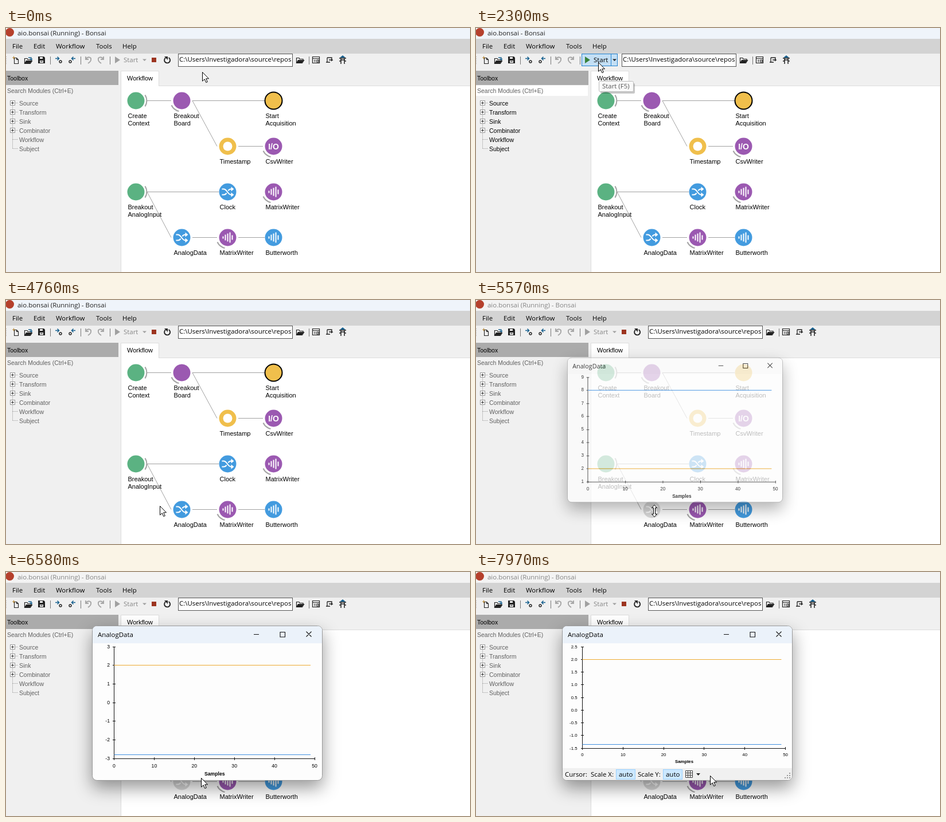
Animation of 809 by 428 pixels, one loop 8 s. Source, as an HTML page:

```html
<!DOCTYPE html>
<html lang="en">
<head>
<meta charset="utf-8">
<title>Workflow editor</title>
<style>
html, body { margin: 0; width: 100%; height: 100%; overflow: hidden; background: #fff; }
svg { display: block; width: 809px; height: 428px; }
text { font: 11px "Liberation Sans", Arial, sans-serif; white-space: pre; }
.ui { font: 11.45px "Open Sans", "Noto Sans", sans-serif; }
.tree { font-size: 10.5px; }
#window { filter: drop-shadow(0 13px 15px rgba(0,0,0,.4)); }
</style>
</head>
<body>
<svg id="stage" viewBox="0 0 809 428"></svg>
<script>
const LOOP = 8000;
const $ = id => document.getElementById(id);
const text = (x, y, s, attrs = '') => `<text x="${x}" y="${y}" ${attrs}>${s}</text>`;
const ui = (x, y, s, attrs = '') => text(x, y, s, 'class="ui" ' + attrs);
const rect = (x, y, w, h, fill, attrs = '') =>
  `<rect x="${x}" y="${y}" width="${w}" height="${h}" fill="${fill}" ${attrs}/>`;
const line = (d, color = '#333', width = 1, attrs = '') =>
  `<path d="${d}" fill="none" stroke="${color}" stroke-width="${width}" ${attrs}/>`;
const shape = (d, fill, attrs = '') => `<path d="${d}" fill="${fill}" ${attrs}/>`;
const at = (x, y, s, flip = 1) => `<g transform="translate(${x} ${y}) scale(${flip} 1)">${s}</g>`;

// Workflow nodes
const GREEN = '#5bb282', PURPLE = '#9b59b1', YELLOW = '#f0bf4c', BLUE = '#439bdf';
const icons = {
  shuffle: line('M-10-5h3c6 0 7 10 13 10h2M-10 5h3c2 0 4-1 5-3M1-2c1-2 3-3 5-3h2', '#fff', 2) +
    shape('M6-9l5 4-5 4zM6 1l5 4-5 4z', '#fff'),
  bars: line('M-8-2v4M-4-5v10M0-7v14M4-9v18M8-4v8', '#fff', 2),
  io: text(0, 5, 'I/O', 'fill="#fff" text-anchor="middle" style="font-size:14px;font-weight:bold"'),
  dot: '<circle r="8" fill="#fff"/>'
};
const arcs = {
  out: line('M16-10A19 19 0 0 1 16 10', '#a5a5a5', 2.2),
  in: line('M-18 8A19.5 19.5 0 0 0-5 18.5', '#a5a5a5', 2.2)
};
function node(col, row, color, label, icon, arc, attrs = '') {
  const names = label.split(' ').map((s, i) => text(-14, 30 + 13 * i, s)).join('');
  return at(226.5 + 80 * col, 127.5 + 80 * row,
    (arcs[arc] || '') + `<circle r="15" fill="${color}" ${attrs}/>` + (icons[icon] || '') + names);
}
const nodes =
  line('M246 127.5H288M325 127.5H451M325 127.5L368 207.5M405 207.5H448M246 287.5H371' +
    'M246 287.5L288 367.5M325 367.5H368M405 367.5H451', '#a0a0a0') +
  node(0, 0, GREEN, 'Create Context', '', 'out') +
  node(1, 0, PURPLE, 'Breakout Board', '', 'in') +
  node(3, 0, YELLOW, 'Start Acquisition', '', '', 'id="ringed" stroke="#000"') +
  node(2, 1, YELLOW, 'Timestamp', 'dot') +
  node(3, 1, PURPLE, 'CsvWriter', 'io', 'in') +
  node(0, 2, GREEN, 'Breakout AnalogInput', '', 'out') +
  node(2, 2, BLUE, 'Clock', 'shuffle') +
  node(3, 2, PURPLE, 'MatrixWriter', 'bars', 'in') +
  node(1, 3, BLUE, 'AnalogData', 'shuffle', '', 'id="picked"') +
  node(2, 3, PURPLE, 'MatrixWriter', 'bars', 'in') +
  node(3, 3, BLUE, 'Butterworth', 'bars');

// Toolbar
const folder = line('M.5 11.5V2.5H5l1 2h6v2M.5 11.5l3-5h10l-3 5z', '#222', 1.2) + shape('M3 7h10l-3 4H1z', '#222');
const sep = x => line(`M${x} 50V64`, '#777');
const undo = line('M2 1v5h5M2 6C6 0 12 2 11 7C11 9 9 11 6 13', '#a6a6a6', 1.9);
const jump = line('M0 3.5H6M3.5 .5l3 3-3 3', '#16608f', 1.5) +
  '<circle cx="9" cy="9" r="2" fill="none" stroke="#222" stroke-width="1.4"/>';
const tools =
  line('M.5 50V63', '#aaa', 1, 'stroke-dasharray="1 2"') +
  at(11, 49, line('M3.5 3.5h4l3 3v7h-7zM7.5 3.5v3h3', '#222', 1.1) + line('M0 3h5M2.5 .5v5', '#b8862d')) +
  at(32, 51, folder + line('M7 1h5v4M10 3l2 2 2-2', '#16608f', 1.3)) +
  at(56, 50, shape('M0 0h10l2 2v10H0z', '#222') + rect(3, 1, 5, 3, '#f0f0f0') + rect(3, 7, 6, 4, '#f0f0f0') + rect(4, 8, 4, 1, '#222')) +
  sep(77.5) + at(86, 50, jump) + at(121, 50, jump, -1) +
  sep(130.5) + at(137, 49, undo) + at(172, 49, undo, -1) + sep(181.5);
const pathBox =
  rect(300.5, 45.5, 199, 22, '#fff', 'stroke="#555"') +
  '<clipPath id="clip"><rect x="301" y="46" width="197" height="21"/></clipPath>' +
  ui(302, 59, 'C:\\Users\\Investigadora\\source\\repos\\', 'clip-path="url(#clip)"') +
  at(506, 50, folder) + sep(528.5) +
  at(534, 50, line('M.5 .5h12v11h-12zM.5 3.5h12M3 6.5h3M3 9h3M8 6h3v4H8z', '#222', 1.2)) +
  at(557, 49, line('M3 3h8v3M3 3v8h5M1 11h7M6 7h6l-2-2M12 7l-2 2', '#222', 1.3)) +
  at(580, 48, shape('M7 0l5 4H2z', '#16608f') + line('M1 5h12M3 8h8M4 5v10M10 5v10M1 10h3M10 10h3', '#222', 1.5));

// Toolbox tree
const tree = ['Source', 'Transform', 'Sink', 'Combinator', 'Workflow', 'Subject'].map((s, i) => {
  const y = 131.5 + 16 * i;
  return line(`M11.5 ${y}H21`, '#999', 1, 'stroke-dasharray="1 1"') +
    (i < 4 ? rect(7.5, y - 4, 8, 8, '#fff', 'stroke="#999"') + line(`M9 ${y}h5M11.5 ${y - 2.5}v5`, '#333') : '') +
    text(23, y + 4, s, 'class="tree"');
}).join('');

// Chart window strip
const button = x => rect(x + .5, 346.5, 33, 17, '#cce8ff', 'stroke="#99d1ff"') + ui(x + 5, 359, 'auto');
const grip = line('M546 353h2M542 357h2m2 0h2M538 361h2m2 0h2m2 0h2', '#999', 2);

const arrow = shape('M.5 .5V16.2L4.2 12.8L6.8 18.6L9.3 17.5L6.7 11.8H11.5Z', '#fff', 'stroke="#000"');
const sizer = shape('M0-10.5L4.5-5.5H1.5V5.5H4.5L0 10.5L-4.5 5.5H-1.5V-5.5H-4.5Z', '#fff', 'stroke="#000"');

$('stage').innerHTML =
  rect(0, 0, 809, 428, '#f0f0f0') +
  rect(0, 0, 809, 19, '#eff4fa', 'id="caption"') +
  '<circle cx="6.5" cy="7.5" r="7.5" fill="#b5402c"/>' + ui(20, 13, '', 'id="title"') +
  rect(0, 19, 809, 26, '#d3d3d3') +
  [[11, 'File'], [48, 'Edit'], [87, 'Workflow'], [157, 'Tools'], [203, 'Help']].map(m => ui(m[0], 36, m[1])).join('') +
  rect(184.5, 45.5, 62, 21, '#c3dff5', 'id="hover" stroke="#2382cf"') +
  line('M235.5 46V67', '#2382cf', 1, 'id="split"') +
  tools + '<path id="play" d="M190 50L199 56L190 62Z"/>' + ui(205, 60, 'Start', 'id="start"') +
  '<path id="drop" d="M238 54.5H245L241.5 58Z"/>' +
  `<g id="running">${rect(248.5, 45.5, 19, 21, '#c3dff5', 'id="stopHover" stroke="#2382cf"')}` +
  rect(254, 52, 8, 8, '#9c3420') +
  line('M278 52.5A5 5 0 1 0 283.5 52', '#222', 1.9) + shape('M276 50h6v6z', '#222') + '</g>' +
  `<g id="path">${pathBox}</g>` +
  rect(0, 75, 196, 25, '#ababab') + text(2, 92, 'Toolbox', 'class="tree"') +
  rect(0, 101, 195, 18, '#fff', 'id="search"') +
  text(2, 114, 'Search Modules (Ctrl+E)', 'class="tree" fill="#606060"') +
  line('M11.5 136V211', '#999', 1, 'stroke-dasharray="1 1"') + `<g id="tree">${tree}</g>` +
  rect(200.5, 101.5, 610, 328, '#fff', 'stroke="#dcdcdc"') +
  shape('M200.5 102V75.5H266.5V102', '#fff', 'stroke="#dcdcdc"') + text(211, 92, 'Workflow') +
  nodes +
  `<g id="tip">${rect(217, 97, 60, 18, '#000', 'opacity=".22" rx="2"')}` +
  rect(214.5, 93.5, 60, 18, '#f9f9f9', 'stroke="#bbb" rx="2"') + ui(220, 106, 'Start (F5)', 'fill="#575757"') + '</g>' +
  '<g id="window">' + rect(150.5, 94.5, 401, 271, '#fdfdfd', 'rx="8" stroke="#999"') +
  shape('M151 125V103Q151 95 159 95H543Q551 95 551 103V125Z', '#ebf2fa', 'id="bar"') +
  ui(160, 114, 'AnalogData') +
  line('M432 109.5H441M478 105.5h8.5v8.5h-8.5zM523.5 104.5l9 9M532.5 104.5l-9 9', '#111', 1.1) +
  '<g id="chart"></g><g id="strip">' +
  shape('M151 344H551V357Q551 365 543 365H159Q151 365 151 357Z', '#f0f0f0') +
  ui(155, 359, 'Cursor:') + ui(200, 359, 'Scale X:') + button(244) + ui(282, 359, 'Scale Y:') + button(326) +
  line('M365.5 348.5h12v12h-12zM365.5 352.5h12M365.5 356.5h12M369.5 348.5v12M373.5 348.5v12', '#444') +
  shape('M384 353h7l-3.5 4z', '#222') + grip + '</g></g>' +
  `<g id="cursor"><g id="arrow">${arrow}</g><g id="sizer">${sizer}</g></g>`;

// Keyed motion: [time, ...values]
function track(keys, t, ease = p => p) {
  let i = 0;
  while (i < keys.length - 1 && t >= keys[i + 1][0]) i++;
  const a = keys[i], b = keys[i + 1];
  if (!b || t <= a[0]) return a.slice(1);
  const p = ease((t - a[0]) / (b[0] - a[0]));
  return a.slice(1).map((v, k) => v + (b[k + 1] - v) * p);
}
const pointer = [
  [70, 342, 77], [300, 332, 90], [700, 245, 67], [870, 251, 59], [1330, 251, 59], [1430, 214, 60],
  [2180, 214, 60], [2300, 213, 60], [3349, 213, 60], [3350, 212, 59], [4460, 212, 59], [4610, 238, 200],
  [4760, 268, 361], [4900, 300, 375], [5000, 322, 372], [5110, 311, 370], [6450, 311, 370],
  [6850, 400, 341], [7000, 411, 348], [7300, 413, 362], [7670, 408, 357]
];
const signal = [[5570, 8], [6020, -5.93], [6300, 5], [6600, -3], [6970, 6], [7400, -6], [7700, 5], [7970, -1.35]];
const smooth = p => (1 - Math.cos(Math.PI * p)) / 2;

function chart(t, compact) {
  const tick = Math.floor((t - 20) / 50) * 50 + 20;
  const v = track(signal, tick, smooth)[0];
  const [moving, steady] = t >= 5800 && t < 6400 ? ['#6b7a72', '#d8421a'] : ['#3f8fe0', '#edaa30'];
  const lo = Math.min(v, 2), hi = Math.max(v, 2), raw = Math.max(hi - lo, .5) / 7;
  const mag = 10 ** Math.floor(Math.log10(raw)), digit = Math.floor(raw / mag + .5);
  const step = mag * (digit > 5 ? 10 : digit > 2 ? 5 : digit > 1 ? 2 : 1);
  const min = Math.floor(lo / step - .01), max = Math.ceil(hi / step + .01);
  const [left, right, bottom, size] = compact ? [185.5, 539.5, 309, 7.8] : [188.5, 538, 327, 8.7];
  const top = 131, px = n => left + (right - left) * n / 50;
  const py = n => Math.floor(bottom - (bottom - top) * (n / step - min) / (max - min)) + .5;
  const font = `style="font-size:${size}px" text-anchor=`;
  let out = line(`M${left} ${top}V${bottom + .5}H${right}`, '#111');
  for (let i = min; i <= max; i++) {
    const y = py(i * step);
    out += line(`M${left - 2.5} ${y}h5`, '#111') +
      text(left - (compact ? 9 : 7.5), y + 2, (i * step).toFixed(step < .1 ? 2 : step < 1 ? 1 : 0), font + '"end"');
  }
  for (let n = 0; n <= 50; n += 10)
    out += line(`M${Math.floor(px(n)) + .5} ${bottom - 2}v5`, '#111') +
      text(px(n), bottom + (compact ? 14 : 16), n, font + '"middle"');
  out += text((left + right) / 2 + .5, bottom + (compact ? 26 : 30), 'Samples',
    `style="font-size:${size}px;font-weight:bold" text-anchor="middle"`);
  const flat = (n, color) => line(`M${left} ${py(n)}H${px(49)}`, color, 1.2);
  return out + flat(v, moving) + flat(2, steady);
}

const show = (id, on) => $(id).style.display = on ? '' : 'none';
const fill = (id, color) => $(id).setAttribute('fill', color);

function draw(t) {
  const running = t < 920 || t >= 3850, away = t >= 5260, hover = t >= 1380 && t < 3850;
  $('title').textContent = `aio.bonsai ${running ? '(Running) ' : ''}- Bonsai`;
  fill('title', away ? '#858585' : '#222');
  fill('caption', away ? '#f3f3f3' : '#eff4fa');
  fill('play', running ? '#a0a0a0' : '#38823a');
  fill('start', running ? '#858585' : '#000');
  fill('drop', running ? '#a0a0a0' : '#222');
  fill('tree', running ? '#606060' : '#000');
  fill('search', running ? '#f0f0f0' : '#fff');
  fill('picked', away ? '#dadada' : BLUE);
  $('ringed').setAttribute('stroke-width', away ? 0 : 2);
  show('running', running);
  show('stopHover', t >= 820 && t < 920);
  show('hover', hover);
  show('split', hover);
  $('path').setAttribute('transform', `translate(${running ? 0 : -46} 0)`);

  show('tip', t >= 1680 && t < 3850);
  $('tip').setAttribute('opacity', Math.min(1, (t - 1630) / 200));

  const opening = Math.min(1, (t - 5500) / 200);
  show('window', opening > 0);
  if (opening > 0) {
    const compact = t >= 7350;
    $('window').setAttribute('opacity', Math.min(1, opening * 2.1));
    $('window').setAttribute('transform', `translate(289 200) scale(${.9 + .1 * opening}) translate(-289 -200)`);
    fill('bar', opening < 1 ? '#f9f9f9' : '#ebf2fa');
    $('chart').innerHTML = chart(t, compact);
    show('strip', compact);
  }

  const [x, y] = track(pointer, t).map(Math.round), sizing = t >= 5500 && t < 6500;
  $('cursor').setAttribute('transform', `translate(${x} ${y})`);
  show('arrow', !sizing);
  show('sizer', sizing);
}

const begin = performance.now();
function frame() {
  draw((performance.now() - begin) % LOOP);
  requestAnimationFrame(frame);
}
frame();
</script>
</body>
</html>
```
